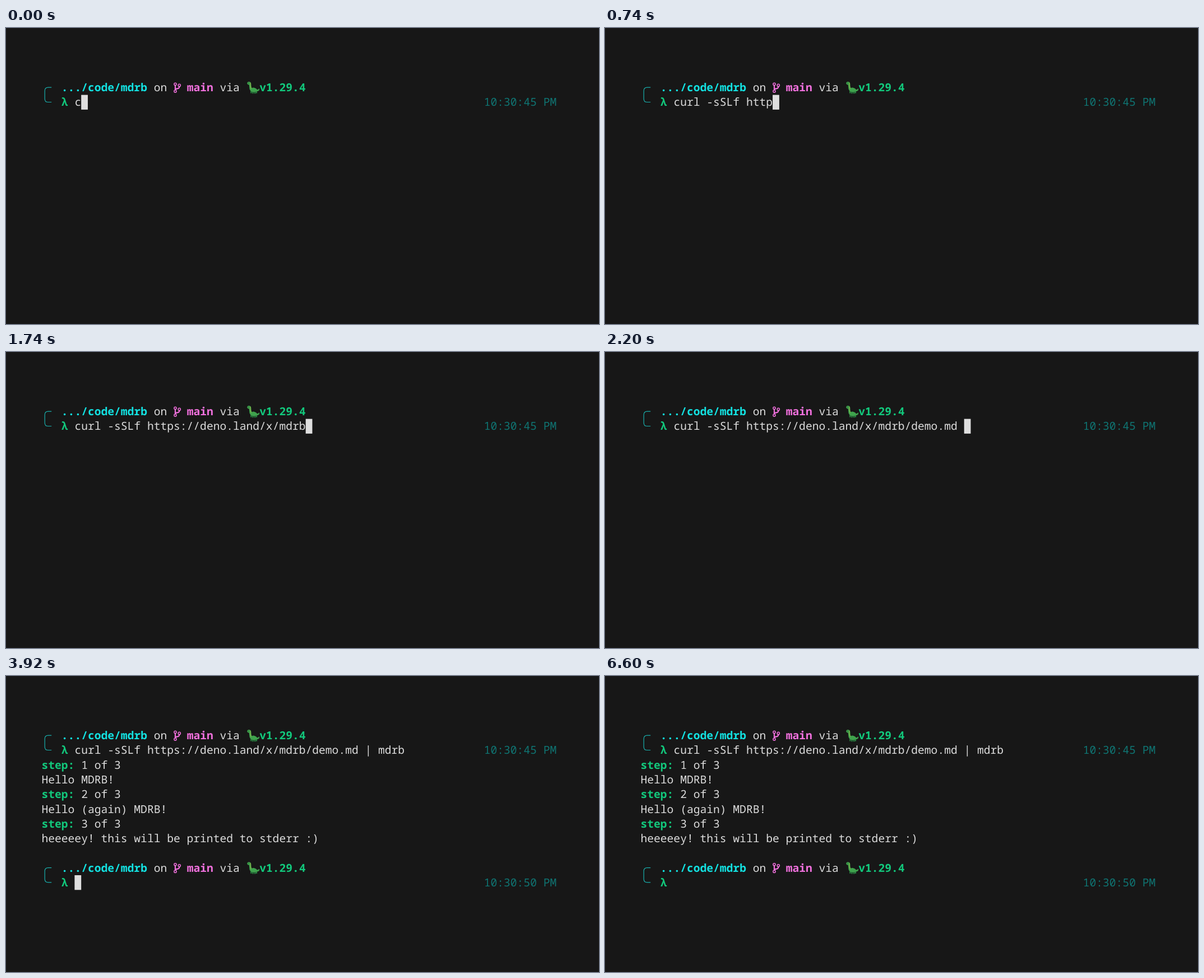
Recreate the animation shown at these times as an HTML page. Size 1058 by 529 pixels, loop 7.12 s.

```html
<!DOCTYPE html>
<html lang="en">
<head>
<meta charset="utf-8">
<title>Terminal</title>
<style>
  html, body { margin: 0; width: 100%; height: 100%; overflow: hidden; background: #171717; }
  svg { display: block; width: 100vw; height: 100vh; }
  text {
    font: 19.633px "Noto Sans Mono", "DejaVu Sans Mono", monospace;
    white-space: pre;
    text-rendering: geometricPrecision;
    fill: #dcdcdc;
  }
  .path { fill: #13e2e2; font-weight: 700; }
  .branch { fill: #f070dc; font-weight: 700; }
  .ok { fill: #12c87c; font-weight: 700; }
  .clock { fill: #0f7472; }
</style>
</head>
<body>
<svg id="stage" viewBox="0 0 1058 529" xmlns="http://www.w3.org/2000/svg">
  <defs>
    <g id="icons" fill="none" stroke-linecap="round">
      <path d="M81.2 106.2H75.4Q69.2 106.2 69.2 112.3V126.4Q69.2 132.5 75.4 132.5H81.2"
            stroke="#1ab0ae" stroke-width="1.2" stroke-linecap="butt"/>
      <g stroke="#f070dc" stroke-width="1.5">
        <circle cx="302" cy="100.3" r="2.1"/>
        <circle cx="302" cy="113" r="2.1"/>
        <circle cx="309.3" cy="102.4" r="2.1"/>
        <path d="M302 102.8V110.5M309.3 104.8Q309.3 108 305.5 108.4Q302.4 108.7 302.1 110.6" stroke-width="2.2"/>
      </g>
      <path d="M437.4 112V116.5M440.6 113V117.3M444.2 113V117.3M447 112V116.5" stroke="#2b8743" stroke-width="2.2" stroke-linecap="butt"/>
      <path d="M430.3 99.2Q430.2 96.3 433.2 96Q437.2 96 437.4 100.3Q437.2 104.6 438.4 107.2
               Q442.2 105.6 446.2 108.2Q448.8 111.6 450.7 109Q451.8 107.6 452.2 109.2
               Q451.8 113.2 448 113Q444.5 115 439.6 114.2Q434.3 112.6 434.2 106.5
               L433.7 101.4Q431 101.4 430.3 99.2Z" fill="#3fa34d"/>
      <path d="M436 98.2Q436 105 437.4 108.4" stroke="#7fb049" stroke-width="1.4"/>
      <circle cx="433.2" cy="98.4" r=".7" fill="#173322"/>
    </g>
  </defs>
</svg>
<script>
const LOOP = 7120, X0 = 63.5, Y0 = 93.3, CW = 11.78, RH = 26.27;
const COMMAND = "curl -sSLf https://deno.land/x/mdrb/demo.md | mdrb";
const stage = document.getElementById("stage");

function add(tag, attrs, parent = stage) {
  const el = document.createElementNS(stage.namespaceURI, tag);
  for (const key in attrs) el.setAttribute(key, attrs[key]);
  return parent.appendChild(el);
}

function write(parent, row, col, string, style = "") {
  const el = add("text", { x: X0 + col * CW, y: Y0 + row * RH + 19.9, class: style }, parent);
  el.textContent = string;
  return el;
}

function prompt(row, clock) {
  const g = add("g", {});
  add("use", { href: "#icons", y: row * RH }, g);
  write(g, row, 3, ".../code/mdrb", "path");
  write(g, row, 17, "on");
  write(g, row, 22, "main", "branch");
  write(g, row, 27, "via");
  write(g, row, 33, "v1.29.4", "ok");
  write(g, row + 1, 3, "λ", "ok");
  write(g, row + 1, 67, clock, "clock");
  return g;
}

function step(row, n) {
  const g = add("g", {});
  write(g, row, 0, "step:", "ok");
  write(g, row, 6, n + " of 3");
  return g;
}

const cursor = add("rect", { width: CW, height: RH, fill: "#dfdfdf" });
prompt(0, "10:30:45 PM");
const input = write(stage, 1, 5, "");

const output = [
  [3100, step(2, 1)],
  [3320, write(stage, 3, 0, "Hello MDRB!")],
  [3340, step(4, 2)],
  [3560, write(stage, 5, 0, "Hello (again) MDRB!")],
  [3580, step(6, 3)],
  [3840, write(stage, 7, 0, "heeeeey! this will be printed to stderr :)")],
  [3920, prompt(9, "10:30:50 PM")]
];

// Steady typing, snapped to 20 ms ticks, with one hesitation.
const late = { 15: 740, 16: 760 };
const keyTimes = [...COMMAND].map((_, i) =>
  i ? late[i + 1] || Math.round((60 + 51 * (i - 1)) / 20) * 20 : 0);

// [time, row, column] of the cursor once the command runs
const moves = [
  [2600, 2, 0], [3100, 3, 0], [3320, 4, 0], [3340, 5, 0], [3560, 6, 0],
  [3580, 7, 0], [3840, 8, 0], [3900, 9, 0], [3920, 10, 5]
];
const blinks = [4480, 5040, 5560, 6080, 6600];

function draw(t) {
  const typed = keyTimes.filter(k => k <= t).length;
  input.textContent = COMMAND.slice(0, typed);
  for (const [start, el] of output) el.style.display = t < start ? "none" : "";

  const [, row, col] = moves.filter(m => m[0] <= t).pop() || [0, 1, 5 + typed];
  cursor.setAttribute("x", X0 + col * CW);
  cursor.setAttribute("y", Y0 + row * RH);
  cursor.style.display = blinks.filter(b => b <= t).length % 2 ? "none" : "";
}

const origin = performance.now();
function frame() {
  draw((performance.now() - origin) % LOOP);
  requestAnimationFrame(frame);
}
draw(0);
requestAnimationFrame(frame);
</script>
</body>
</html>
```
